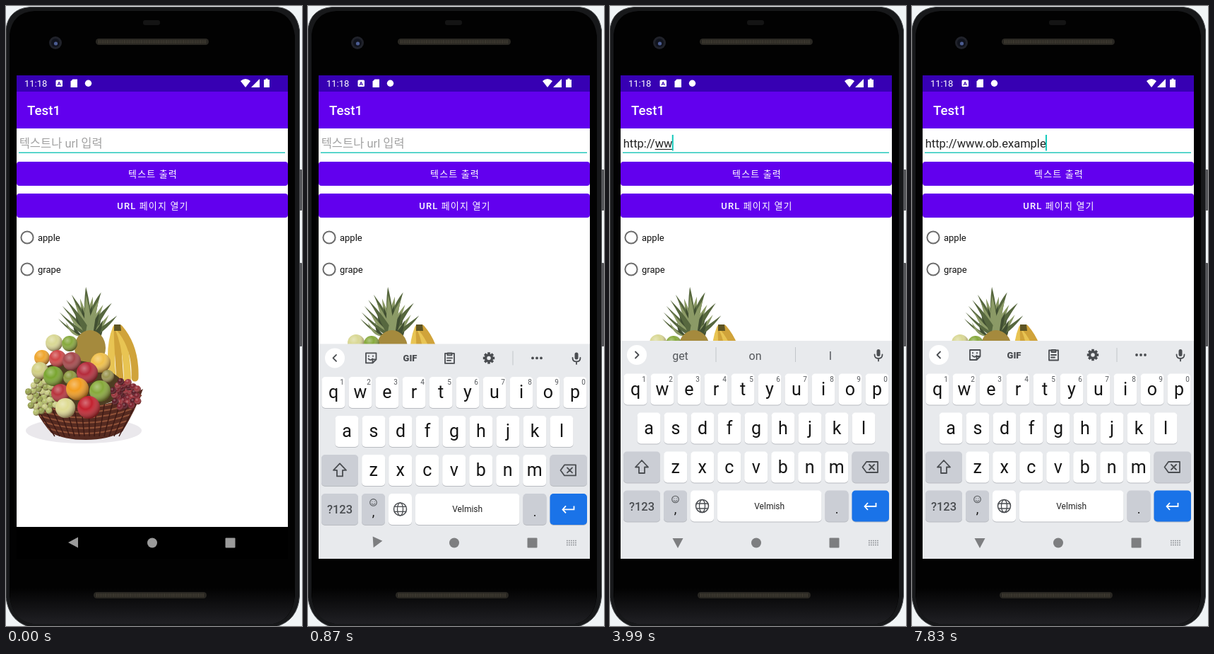
An HTML page for the animation above (8 s loop, 419x876 px).

```html
<!DOCTYPE html>
<html lang="ko">
<head>
<meta charset="utf-8">
<style>
html, body { margin: 0; width: 100%; height: 100%; overflow: hidden; background: #f0f4f6; }
svg { display: block; width: 419px; height: 876px; }
text { font-family: Roboto, 'Noto Sans CJK KR', 'Noto Sans CJK', sans-serif; white-space: pre; }
.mid { text-anchor: middle; }
.line { fill: none; stroke: #4a4d51; stroke-width: 1.8; stroke-linejoin: round; stroke-linecap: round; }
.button { fill: #fff; font-size: 13px; font-weight: 500; letter-spacing: 1.15px; text-anchor: middle; }
</style>
</head>
<body>
<svg id="stage" viewBox="0 0 419 876"></svg>
<script>
const LOOP = 8000;
const range = n => [...Array(n).keys()];
const rect = (x, y, w, h, fill, r = 0, extra = '') =>
  `<rect x="${x}" y="${y}" width="${w}" height="${h}" rx="${r}" fill="${fill}" ${extra}/>`;
const circle = (x, y, r, fill, extra = '') =>
  `<circle cx="${x}" cy="${y}" r="${r}" fill="${fill}" ${extra}/>`;
const text = (x, y, size, fill, str, extra = '') =>
  `<text x="${x}" y="${y}" font-size="${size}" fill="${fill}" ${extra}>${str}</text>`;
const path = (d, fill, extra = '') => `<path d="${d}" fill="${fill}" ${extra}/>`;
const line = d => `<path class="line" d="${d}"/>`;
const mid = 'class="mid"';

function phone() {
  const speaker = (x, y) => rect(x, y, 160, 9, '#292722', 4.5) +
    path(`M${x + 4} ${y + 4.5}h152`, 'none', 'stroke="#484338" stroke-width="5" stroke-dasharray="1 1.4"');
  return `<defs>
    <linearGradient id="chin" x2="0" y2="1"><stop offset="0" stop-color="#020202"/><stop offset="1" stop-color="#202024"/></linearGradient>
    <radialGradient id="shade" cx=".36" cy=".3" r=".72"><stop offset="0" stop-color="#fff" stop-opacity=".35"/><stop offset=".4" stop-color="#fff" stop-opacity="0"/><stop offset="1" stop-color="#2a1008" stop-opacity=".55"/></radialGradient>
    <clipPath id="screen"><rect x="15" y="98" width="384" height="683"/></clipPath></defs>` +
    rect(414, 231, 5, 58, '#55565a', 1) + rect(414, 363, 5, 118, '#55565a', 1) +
    path('M0 32Q4 4 34 1.500H384Q411 4 415.500 34V834Q413 868 382 877H32Q4 868 0 836Z', '#17181a', 'stroke="#4a4c4f"') +
    path('M5 40Q9 9 40 7H376Q405 9 409 42V834Q405 868 378 873H38Q9 868 5 834Z', '#020202') +
    path('M6 822H408V838Q403 868 378 873H38Q10 868 6 838Z', 'url(#chin)') +
    rect(194, 20, 24, 7, '#141414', 3) + speaker(127, 46) + speaker(124, 828) +
    circle(70, 52, 9, '#20222a') + circle(70, 52, 6, '#10131d') + circle(70.5, 53, 2.6, '#4c5d92');
}

function app() {
  const radio = (y, label) =>
    circle(30, y, 8.6, 'none', 'stroke="#6b6b6b" stroke-width="2"') + text(45, y + 4.5, 13, '#111', label);
  return rect(15, 98, 384, 683, '#000') + rect(15, 98, 384, 23, '#3700b3') +
    rect(15, 121, 384, 52, '#6200ee') + rect(15, 173, 384, 563, '#fff') +
    text(26, 114, 13, '#fff', '11:18') +
    rect(70.5, 104.5, 9.5, 9.5, '#fff', 1.5) + text(75.3, 112.3, 8, '#3700b3', 'A', 'class="mid" font-weight="700"') +
    path('M94.500 103.500H101V115H91.500V106.500Z', '#fff') + circle(116.5, 109.3, 4.7, '#fff') +
    path('M332 106Q339 100 346 106L339 115Z', '#fff') + path('M359 103V115H347Z', '#fff') +
    path('M367.500 102.500h3v1.500h2.500v11h-8v-11h2.500z', '#fff') +
    text(30, 154, 18.7, '#fff', 'Test1', 'font-weight="500"') +
    rect(18, 206.5, 377, 1.5, '#27c8bc') +
    rect(15, 220, 384, 34, '#6200ee', 4) + rect(15, 265, 384, 34, '#6200ee', 4) +
    '<text class="button" x="208" y="241.500">텍스트 출력</text>' +
    '<text class="button" x="208" y="286.500">URL 페이지 열기</text>' +
    radio(327, 'apple') + radio(372, 'grape');
}

function fruitBasket() {
  const ball = (x, y, r, color) => circle(x, y, r, color) + circle(x, y, r, 'url(#shade)');
  const leaves = range(26).map(i => {
    const angle = (i * 10 % 26 / 25 - .5) * 2.2;
    const length = 67 - Math.abs(angle) * 18 - i % 3 * 12;
    const x = 116 + Math.sin(angle) * length, y = 463 - Math.cos(angle) * length;
    return path(`M112 466Q${110 + angle * 16} ${y + 24} ${x} ${y}Q${121 + angle * 16} ${y + 27} 123 466Z`,
      ['#57683f', '#8b9a66', '#414f32'][i % 3]);
  }).join('');
  const scales = range(7).map(i =>
    `M${88 + i * 9} 462l26 46M${150 - i * 9} 462l-26 46`).join('');
  const bananas = range(4).map(i =>
    `<path d="M${156 + i * 1.5} 455Q${145 + i * 13} 482 ${151 + i * 10.5} ${530 - Math.abs(i - 1.5) * 3}" fill="none"
      stroke="${i % 2 ? '#d0a33a' : '#e8c453'}" stroke-width="10" stroke-linecap="round"/>`).join('');
  const cluster = (n, cx, cy, rx, ry, r, colors) => range(n).map(i => {
    const a = i * 2.4, d = Math.sqrt((i + .5) / n);
    return ball(cx + Math.cos(a) * d * rx, cy + Math.sin(a) * d * ry, r, colors[i % colors.length]);
  }).join('');
  const fruit = [
    [68, 476, 12, '#d9d894'], [90, 477, 11, '#86a93c'], [51, 497, 11, '#efa62e'], [48, 515, 12, '#d2d084'],
    [73, 498, 12, '#cf4546'], [93, 502, 13, '#a5474b'], [134, 504, 14, '#f0c04a'], [91, 525, 10, '#8b983e'],
    [115, 518, 15, '#b52b3b'], [67, 523, 14, '#79a52f'], [144, 523, 9, '#9a9550'], [77, 547, 13, '#b7343d'],
    [133, 544, 15, '#86a93a'], [101, 541, 16, '#f29d20'], [84, 568, 14, '#dedb93'], [117, 567, 16, '#c2212e']
  ];
  const weave = range(6).map(i =>
    `M${30 + i * 6} ${552 + i * 9}Q112 ${582 + i * 6} ${192 - i * 5} ${550 + i * 9}`).join('');
  const ribs = range(14).map(i => `M${36 + i * 11.6} 556L${69 + i * 7} 608`).join('');
  return '<ellipse cx="110" cy="600" rx="82" ry="18" fill="#eae8ec"/>' + leaves +
    '<ellipse cx="119" cy="483" rx="22" ry="25" fill="#a58a3d"/>' +
    path(scales, 'none', 'stroke="#655427" stroke-width="1.600" style="clip-path:ellipse(22px 25px at 119px 483px)"') +
    bananas + path('M153 450h9l1 9h-10z', '#5d5424') +
    path('M28 541Q110 590 194 541Q184 570 165 601Q145 613 113 613Q82 613 64 603Q42 578 28 541Z', '#552a20') +
    path(weave, 'none', 'stroke="#8f5138" stroke-width="2.200"') +
    path(ribs, 'none', 'stroke="#3d1a15" stroke-width="1.500"') +
    path('M50 512Q110 485 160 525L172 548Q110 585 46 552Z', '#4e3d22') +
    cluster(30, 51, 552, 22, 25, 4.7, ['#b3bd68', '#96a14d', '#c8cb82']) +
    cluster(30, 169, 549, 20, 20, 4.8, ['#7a1d29', '#551520', '#9a3038']) +
    fruit.map(f => ball(...f)).join('');
}

function keyboard() {
  const key = (x, y, w, fill = '#fff') => rect(x, y + 1.5, w, 44, '#b9bcc1', 5) + rect(x, y + .5, w, 44, fill, 5);
  const grey = '#cbced5';
  const row = (letters, x, y, numbered) => [...letters].map((c, i) =>
    key(x + i * 38, y, 33) + text(x + 16.5 + i * 38, y + 30.5, 25, '#151515', c, mid) +
    (numbered ? text(x + 28.5 + i * 38, y + 11.5, 10, '#55585c', (i + 1) % 10, mid) : '')).join('');
  const teeth = range(8).map(i =>
    rect(254.2, 484.8, 3.6, 4, '#4a4d51', 0, `transform="rotate(${i * 45} 256 493)"`)).join('');
  const icons = line('M40 488.500l-4.500 4.500 4.500 4.500') +
    line('M82 486h14.500v9l-5 5H82zM96.500 495h-5v5M86 490v.5M92 490v.5M85.500 494q3 3.500 6 0') +
    text(144.5, 498, 13, '#4a4d51', 'GIF', 'class="mid" font-weight="900"') +
    line('M194 486.500h13v14h-13zM197.500 486v3h6v-3zM197 493h7M197 496.500h5') +
    teeth + circle(256, 493, 4.5, 'none', 'stroke="#4a4d51" stroke-width="3.500"') +
    rect(289.5, 483, 1, 20, '#c2c5ca') + [318, 324, 330].map(x => circle(x, 493, 1.9, '#4a4d51')).join('');
  const words = [99.5, 205.5, 312].map(x => text(x, 499.5, 16, '#55585c', '', 'class="mid word"')).join('');
  return rect(15, 473, 384, 310, '#e8eaed') + circle(38, 493, 14, '#fff') +
    `<g id="icons">${icons}</g><g id="words">` + line('M36 488.500l4.500 4.500-4.500 4.500') + words +
    rect(149.5, 482, 1, 21, '#c2c5ca') + rect(262, 482, 1, 21, '#c2c5ca') + '</g>' +
    rect(377.5, 485, 5, 10, '#4a4d51', 2.5) + line('M374.500 492.500q0 5.500 5.500 5.500t5.500-5.500M380 498v3.500') +
    row('qwertyuiop', 19.5, 519, true) + row('asdfghjkl', 38.5, 574) + row('zxcvbnm', 76.2, 629) +
    key(19, 629, 52, grey) + line('M45 642l-9 9.500h5v8.500h8v-8.500h5z') +
    key(342.5, 629, 52.5, grey) + line('M363 644h16v15h-16l-5.500-7.500zM367 648l7 7M374 648l-7 7') +
    key(19, 684, 52, grey) + text(45, 712.5, 16.5, '#4a4d51', '?123', 'class="mid" font-weight="500"') +
    key(76, 684, 33, grey) + circle(92.5, 697, 4.8, 'none', 'stroke="#55585c" stroke-width="1.100"') +
    path('M89.800 698.500q2.700 3 5.400 0M90.800 695.500v.8M94.200 695.500v.8', 'none', 'stroke="#55585c"') +
    text(92.5, 716.5, 18, '#151515', ',', mid) +
    key(114, 684, 33) + circle(130.5, 706.5, 9, 'none', 'class="line" style="stroke-width:1.500"') +
    `<g style="stroke-width:1.300" class="line"><ellipse cx="130.500" cy="706.500" rx="4" ry="9"/><path d="M122.500 703h16M122.500 710h16"/></g>` +
    key(152, 684, 147.5) + text(225.7, 711, 12, '#222', 'Velmish', mid) +
    key(304.5, 684, 33, grey) + text(321, 717, 18, '#151515', '.', mid) +
    key(342.5, 684, 52.5, '#1a73e8') +
    path('M376.500 702v5h-16M365 702l-4.500 5 4.500 5', 'none', 'stroke="#fff" stroke-width="1.800"');
}

function navigation() {
  const dots = range(3).map(i => `M366 ${755.5 + i * 3}h14`).join('');
  return '<g id="nav">' + path('M88 758L102 750.500V765.500Z', 'inherit', 'id="back"') +
    circle(207, 758.5, 7, 'inherit') + rect(310.5, 751.5, 14, 14, 'inherit', 1) + '</g>' +
    path(dots, 'none', 'id="switcher" stroke="#8d9095" stroke-width="1.600" stroke-dasharray="1.800 1.200"');
}

const stage = document.getElementById('stage');
stage.innerHTML = phone() + app() + fruitBasket() +
  text(18.7, 199.5, 16.5, '#a2a2a2', '텍스트나 url 입력', 'id="hint"') +
  text(18.7, 200, 16.5, '#222', '', 'id="input"') +
  rect(0, 202, 0, 1.1, '#222', 0, 'id="compose"') +
  rect(0, 182, 2, 22.5, '#12c9bb', 0, 'id="caret"') +
  `<g clip-path="url(#screen)"><g id="keys">${keyboard()}</g>${navigation()}</g>`;

const byId = id => document.getElementById(id);
const [hint, input, compose, caret, keys, icons, words, nav, back, switcher] =
  ['hint', 'input', 'compose', 'caret', 'keys', 'icons', 'words', 'nav', 'back', 'switcher'].map(byId);
const wordSlots = [...document.querySelectorAll('.word')];

// Each edit restarts the caret blink.
const W = 'http://www.';
const edits = [
  [-850, ''], [1050, ''], [1500, 'h'], [1920, ''], [2190, 'h'], [2400, 'ht'], [2580, 'htt'], [2670, 'http'],
  [2850, 'http'], [3330, 'http:'], [3510, 'http:/'], [3660, 'http://'], [3840, 'http://w'], [3960, 'http://ww'],
  [4110, 'http://www'], [4260, W], [4410, W + 'p'], [4560, W + 'pn'], [4800, W + 'p'], [4980, W], [5100, W + 'o'],
  [5520, W + 'ob'], [5640, W + 'ob.'], [5760, W + 'ob.e'], [5880, W + 'ob.ex'], [6450, W + 'ob.exs'],
  [6720, W + 'ob.ex'], [6810, W + 'ob.exa'], [6930, W + 'ob.exam'], [7650, W + 'ob.examp'],
  [7740, W + 'ob.exampl'], [7830, W + 'ob.example']
];
const suggestions = [
  [0, ''], [1710, 'he have had'], [1980, ''], [2430, 'he have had'], [2850, 'http https the'],
  [3600, ''], [3900, 'get on I'], [4320, '']
];
const latest = (list, t) => list.filter(item => item[0] <= t).pop();

// Solves cubic-bezier(.4, 0, .2, 1) by bisection.
function ease(p) {
  if (p <= 0 || p >= 1) return p <= 0 ? 0 : 1;
  let low = 0, high = 1;
  for (let i = 0; i < 20; i++) {
    const s = (low + high) / 2, x = 1.2 * s * (1 - s) ** 2 + .6 * s * s * (1 - s) + s ** 3;
    if (x < p) low = s; else high = s;
  }
  return 3 * low * low - 2 * low ** 3;
}

const show = (node, on) => node.setAttribute('visibility', on ? 'visible' : 'hidden');

function render(t) {
  const [editTime, value] = latest(edits, t);
  const wordList = latest(suggestions, t)[1];

  input.textContent = value;
  show(hint, !value);
  const end = 18.7 + (value ? input.getComputedTextLength() : 0);
  const start = value.lastIndexOf('/') + 1;
  const startX = 18.7 + (start ? input.getSubStringLength(0, start) : 0);
  compose.setAttribute('x', startX);
  compose.setAttribute('width', wordList && value ? Math.max(0, end - startX) : 0);
  caret.setAttribute('x', end - .7);
  show(caret, Math.floor((t - editTime) / 500) % 2 === 0);

  show(icons, !wordList);
  show(words, wordList);
  wordSlots.forEach((slot, i) => slot.textContent = wordList.split(' ')[i] || '');

  const rise = ease((t - 687) / 218);
  keys.setAttribute('transform', `translate(0 ${308 * (1 - rise)})`);
  back.setAttribute('transform', `rotate(${-90 * ease((t - 755) / 250)} 96 758)`);
  nav.setAttribute('fill', rise < .2 ? '#9b9b9b' : '#7d7e80');
  show(switcher, t >= 840);
}

function tick() {
  render(performance.now() % LOOP);
  requestAnimationFrame(tick);
}
tick();
</script>
</body>
</html>
```
